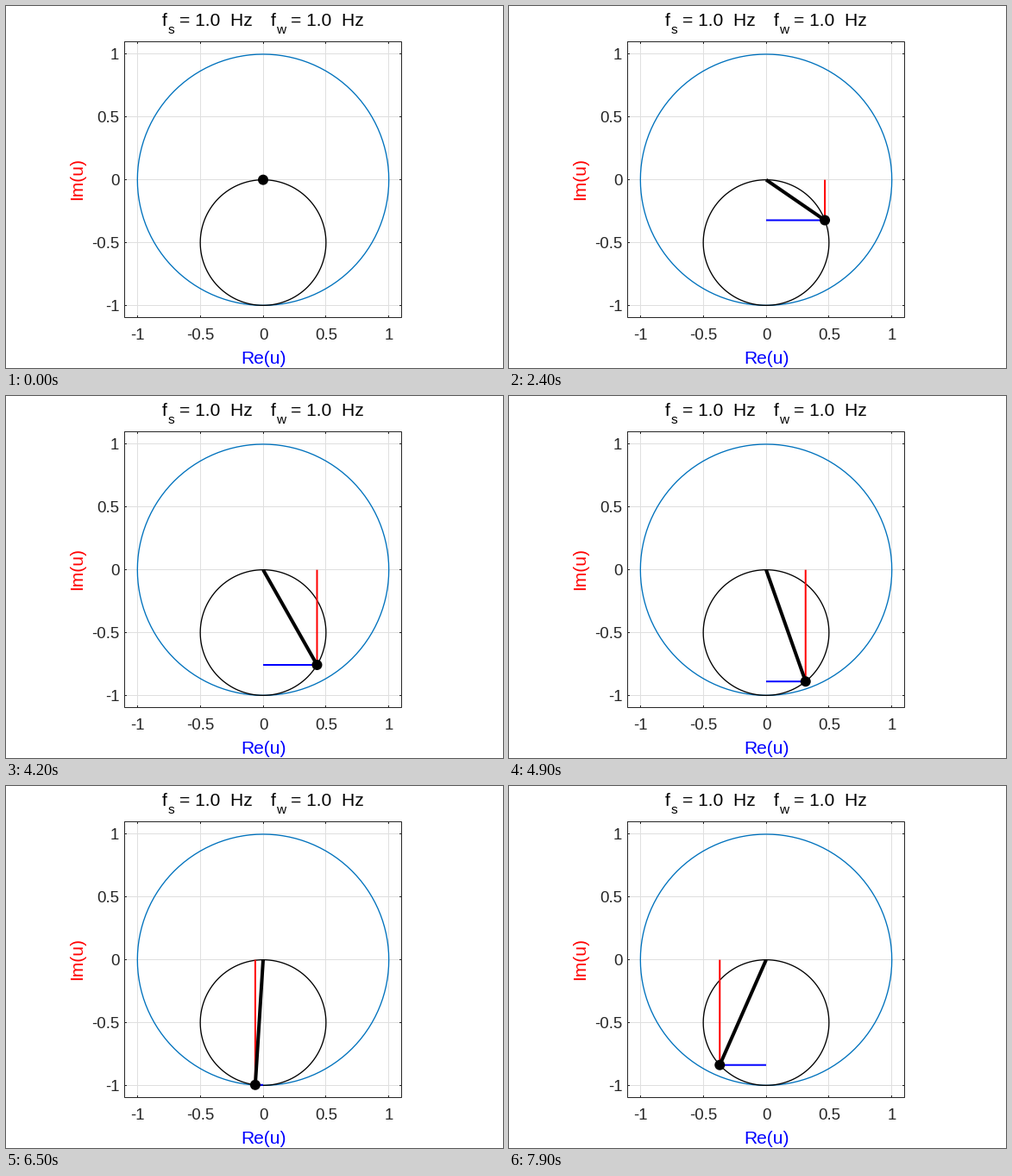
A matplotlib script for the animation above (8000 ms loop, 576 by 420 pixels).

```python
import numpy as np
import matplotlib.pyplot as plt
from matplotlib.animation import FuncAnimation

W, H, DPI = 576, 420, 96
FRAMES, INTERVAL = 80, 100
STEP = 2 * np.pi / 125          # phase advance per frame
CX, CY, UNIT = 298, 201.65, 145.7
LEFT, RIGHT, TOP, BOTTOM = 137.5, 458.5, 41.5, 361.5
TICK = 2.5
AXIS, GRID, BLUE = "#262626", "#dfdfdf", "#0072bd"
TICK_PX, LABEL_PX, SUB_PX = 18.67, 21, 15.4

plt.rcParams["font.family"] = "Liberation Sans"


def pt(px):
    return px * 72 / DPI


def to_px(x, y):
    return CX + UNIT * x, CY - UNIT * y


fig = plt.figure(figsize=(W / DPI, H / DPI), dpi=DPI, facecolor="white")
ax = fig.add_axes([0, 0, 1, 1])
ax.set_xlim(0, W)
ax.set_ylim(H, 0)
ax.axis("off")


def line(xs, ys, color, px, **kw):
    kw.setdefault("solid_capstyle", "butt")
    return ax.plot(xs, ys, color=color, lw=pt(px), snap=False, **kw)[0]


def label(x, y, s, px, color="black", ha="left", **kw):
    ax.text(x, y, s, fontsize=pt(px), color=color, ha=ha, va="baseline", **kw)


def circle(yc, r, color):
    a = np.linspace(0, 2 * np.pi, 241)
    line(*to_px(r * np.cos(a), yc + r * np.sin(a)), color, 1.33, zorder=3)


# Grid, ticks and tick labels
for v in (-1, -0.5, 0, 0.5, 1):
    px, py = to_px(v, v)
    x, y = np.floor(px) + 0.5, np.floor(py) + 0.5
    line([x, x], [TOP, BOTTOM], GRID, 1, zorder=1)
    line([LEFT, RIGHT], [y, y], GRID, 1, zorder=1)
    for edge, d in ((TOP, TICK), (BOTTOM, -TICK)):
        line([x, x], [edge, edge + d], AXIS, 1, zorder=2)
    for edge, d in ((LEFT, TICK), (RIGHT, -TICK)):
        line([edge, edge + d], [y, y], AXIS, 1, zorder=2)
    label(px, 387, f"{v:g}", TICK_PX, AXIS, "center")
    label(131.3, py + 6.5, f"{v:g}", TICK_PX, AXIS, "right")

line([LEFT, RIGHT, RIGHT, LEFT, LEFT], [TOP, TOP, BOTTOM, BOTTOM, TOP], AXIS, 1,
     zorder=2, solid_capstyle="projecting", solid_joinstyle="miter")

# Axis labels and title
label(298.3, 415, "Re(u)", LABEL_PX, "blue", "center")
label(88.6, 200.8, "Im(u)", LABEL_PX, "red", "center",
      rotation=90, rotation_mode="anchor")
for x, sub, x_eq in ((181, "s", 201), (307, "w", 330)):
    label(x, 23, "f", LABEL_PX)
    label(x + 6.2, 31.5, sub, SUB_PX)
    label(x_eq, 23, "= 1.0  Hz", LABEL_PX)

circle(0, 1, BLUE)
circle(-0.5, 0.5, "black")

im_part = line([], [], "red", 2, zorder=4)
re_part = line([], [], "blue", 2, zorder=4)
phasor = line([], [], "black", 4, zorder=5)
dot = ax.add_patch(plt.Circle((CX, CY), 6, color="black", lw=0, zorder=6))


def update(i):
    a = i * STEP
    x, y = to_px(0.5 * np.sin(a), 0.5 * (np.cos(a) - 1))
    im_part.set_data([x, x], [CY, y])
    re_part.set_data([CX, x], [y, y])
    phasor.set_data([CX, x], [CY, y])
    dot.center = x, y
    return im_part, re_part, phasor, dot


anim = FuncAnimation(fig, update, frames=FRAMES, interval=INTERVAL,
                     repeat=True, repeat_delay=0, blit=False)
plt.show()
```
